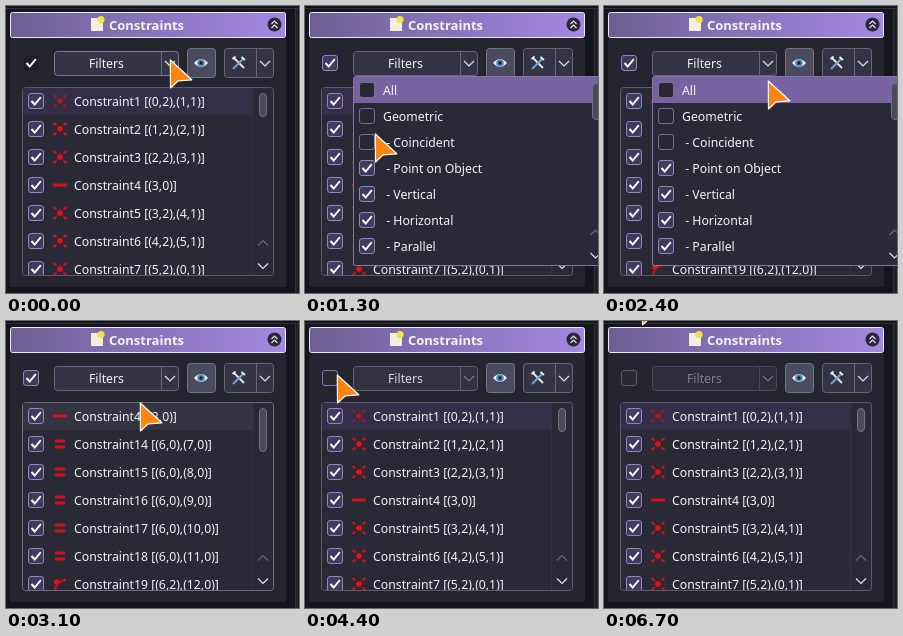
Animation of 293x287 px, one loop 6800 ms. Source, as an HTML page:

```html
<!DOCTYPE html>
<html lang="en">
<head>
<meta charset="utf-8">
<title>Constraints filter</title>
<style>
html, body { margin: 0; width: 100%; height: 100%; overflow: hidden; background: #15151e; }
svg { display: block; width: 100vw; height: 100vh; }
text { font: 12.27px "Noto Sans", "Open Sans", sans-serif; fill: #f4f3f8; white-space: pre; }
.title { font-size: 13px; font-weight: 700; }
.line { fill: none; stroke: #e4e2ec; stroke-width: 1.2; }
.button { fill: #343444; stroke: #68667a; }
.red { fill: none; stroke: #d0141a; stroke-width: 2; }
.thick { stroke-width: 3; }
.dot { fill: #d9161c; stroke: #5c1018; stroke-width: .6; }
</style>
</head>
<body>
<svg id="stage" viewBox="0 0 293 287" preserveAspectRatio="none">
  <defs>
    <linearGradient id="header"><stop stop-color="#6d5f94"/><stop offset="1" stop-color="#a488e2"/></linearGradient>
    <linearGradient id="smear" x1="0" y1="0" x2="0" y2="1">
      <stop stop-color="#57555d"/><stop offset=".4" stop-color="#4d4a56"/>
      <stop offset=".75" stop-color="#484258"/><stop offset="1" stop-color="#3d394b"/>
    </linearGradient>
    <clipPath id="listClip"><rect x="17" y="82" width="250" height="187"/></clipPath>
    <clipPath id="popupClip"><rect id="reveal" x="47" width="246" height="300"/></clipPath>
  </defs>

  <rect width="293" height="287" fill="#15151e"/>
  <path d="M0 2.5H293M289.5 3V287" stroke="#30303c" fill="none"/>
  <rect x="290" y="3" width="3" height="284" fill="#20202a"/>
  <rect x="4" y="32" width="276" height="249" rx="2" fill="#252530"/>

  <rect x="4.5" y="6.5" width="275" height="25" rx="2" fill="url(#header)" stroke="#ece8f7"/>
  <path d="M85 12H97V25H85Z" fill="#f3f0df"/>
  <circle cx="95" cy="13.5" r="3.6" fill="#f3e34a"/>
  <text class="title" x="103" y="24">Constraints</text>
  <circle cx="268.5" cy="18.5" r="7" fill="#2b273a"/>
  <path class="line" d="M265.5 18L268.5 15L271.5 18M265.5 22L268.5 19L271.5 22"/>

  <g id="master"></g>
  <g id="combo">
    <rect id="comboBox" class="button" x="48.5" y="45.5" width="124" height="24" rx="3"/>
    <path d="M155.5 46V69" stroke="#68667a"/>
  </g>
  <text id="filters" x="83" y="62">Filters</text>
  <path id="comboArrow" class="line" d="M159 55L164 60L169 55"/>

  <rect x="181.5" y="42.5" width="28" height="29" rx="3" fill="#4a4b5c" stroke="#737487"/>
  <path d="M188 57Q195 49 202 57Q195 65 188 57Z" fill="#f0f0f4"/>
  <circle cx="195" cy="57" r="3.8" fill="#4a8fc2"/><circle cx="195" cy="57" r="1.8" fill="#17202c"/>
  <rect class="button" x="218.5" y="42.5" width="49" height="29" rx="3"/>
  <path d="M250.5 43V71" stroke="#68667a"/>
  <path d="M228 52L238 62" stroke="#e8e9ee" stroke-width="1.8"/>
  <path d="M237 53L227 63" stroke="#6fa4d8" stroke-width="2"/>
  <path d="M226.5 53L229.5 50.5M235.5 51L239 54" stroke="#e8e9ee" stroke-width="2"/>
  <path class="line" d="M254 55L259 60L264 55"/>

  <rect id="listFrame" x="16.5" y="81.5" width="251" height="188" rx="3" fill="#292a35"/>
  <g clip-path="url(#listClip)">
    <path d="M246.5 82V269" stroke="#343541"/>
    <g id="fullList"></g>
    <rect id="listHover" x="17" y="82" width="229" height="27" fill="#343541"/>
    <g id="filteredList"></g>
  </g>
  <rect id="thumb" x="253.5" y="87.5" width="7" rx="3.5" fill="#4b4a59" stroke="#737181"/>
  <path class="line" d="M252 239.5L257 234.5L262 239.5" style="stroke:#696773"/>
  <path class="line" d="M252 257.5L257 262.5L262 257.5"/>

  <g id="popup" clip-path="url(#popupClip)">
    <rect x="48.5" y="70.5" width="250" height="189" rx="2" fill="#292a35" stroke="#8177a3"/>
    <rect x="49" y="71" width="250" height="26" fill="#7763a3"/>
    <rect id="hoverRow" x="49" y="123" width="235" height="26" fill="#3c3950"/>
    <g id="options"></g>
    <rect x="287.5" y="77.5" width="9" height="36" rx="3.5" fill="#4b4a59" stroke="#737181"/>
    <path class="line" d="M285.5 229L290.5 224L295.5 229" style="stroke:#696773"/>
    <path class="line" d="M285.5 247L290.5 252L295.5 247"/>
  </g>
  <path id="band" fill="url(#smear)" opacity=".97"/>

  <path id="cursor" d="M1.3 2L1.5 30L9.3 22.8L22.800 21.800Z" fill="#ff8410" stroke="#fff" stroke-width="1.2" stroke-linejoin="round"/>
</svg>
<script>
const LOOP = 6800, STEP = 100;
const el = id => document.getElementById(id);
const set = (id, attrs) => Object.entries(attrs).forEach(([k, v]) => el(id).setAttribute(k, v));
const show = (id, on) => set(id, { visibility: on ? "visible" : "hidden" });

const checkbox = (x, y, name = "") => `<g class="${name}" transform="translate(${x} ${y})">
  <rect class="box" x="-7.5" y="-7.5" width="15" height="15" rx="2.5" fill="#42395f" stroke="#9585bd"/>
  <path class="tick" d="M-4.500 0L-1.300 3.500L4.800-3.800" fill="none" stroke="#fff" stroke-width="1.9"/></g>`;

const icons = {
  coincident: '<path class="red" d="M-6.500-6L-3.500-3.500M6.500-6L3.500-3.500M-6.500 6L-3.500 3.500M6.500 6L3.500 3.500"/><circle class="dot" r="3.200"/>',
  horizontal: '<path class="red thick" d="M-7 0H7"/>',
  equal: '<path class="red thick" d="M-5-3H5M-5 3H5"/>',
  onObject: '<path class="red" d="M-5 8Q-5-2 5-4"/><circle class="dot" cx="-3" cy="-2" r="3.200"/><circle class="dot" cx="4.500" cy="-4" r="1.800"/>'
};

const listRows = rows => rows.map(([n, points, icon], i) => {
  const y = 95 + 28 * i;
  return checkbox(30, y) + `<g transform="translate(54 ${y})">${icons[icon]}</g>
    <text x="68" y="${y + 5}">Constraint${n} [${points}]</text>`;
}).join("");

const pairs = ["(0,2),(1,1)", "(1,2),(2,1)", "(2,2),(3,1)", "(3,0)", "(3,2),(4,1)", "(4,2),(5,1)", "(5,2),(0,1)"];
el("fullList").innerHTML = '<rect x="17" y="82" width="229" height="27" fill="#352e48"/>' +
  listRows(pairs.map((p, i) => [i + 1, p, i === 3 ? "horizontal" : "coincident"])) +
  '<rect x="46" y="87" width="16" height="16" fill="#352e48" opacity=".35"/>';
el("filteredList").innerHTML = listRows([
  [4, "(3,0)", "horizontal"],
  ...[7, 8, 9, 10, 11].map(k => [k + 7, `(6,0),(${k},0)`, "equal"]),
  [19, "(6,2),(12,0)", "onObject"]
]);

const options = ["All", "Geometric", " - Coincident", " - Point on Object", " - Vertical", " - Horizontal", " - Parallel"];
el("options").innerHTML = options.map((label, i) =>
  checkbox(62, 84 + 26 * i, i < 3 ? "toggle" : "") +
  `<text x="78" y="${89 + 26 * i}">${label}</text>`).join("");
el("master").innerHTML = checkbox(25, 57);

function styleCheckbox(group, checked, fill, border) {
  const box = group.querySelector(".box");
  group.querySelector(".tick").style.visibility = checked ? "visible" : "hidden";
  box.style.fill = fill;
  box.style.stroke = border;
}
const setChecked = (group, on, border) =>
  styleCheckbox(group, on, on ? "#42395f" : "#292832", on ? "#9585bd" : border);

// time, x, y
const path = [
  [0, 163, 52], [400, 163, 52], [700, 145, 73], [1000, 92, 79], [1300, 69, 126], [2100, 69, 126],
  [2400, 163, 73], [2500, 163, 73], [3100, 133, 80], [3200, 130, 78], [3700, 33, 56], [3800, 33, 56],
  [4200, 31, 52], [4500, 31, 52], [5000, 62, 96], [5300, 145, 138], [5700, 94, 92], [5800, 62, 52],
  [5900, 38, -36], [6400, 38, -36], [6500, 37, -26], [6800, 37, -26]
];
const clamp = v => Math.max(0, Math.min(1, v));
const ramp = (t, a, b) => clamp((t - a) / (b - a));

function cursorAt(t) {
  const i = path.findIndex(p => p[0] > t);
  const [a, b] = [path[i - 1], path[i]];
  const u = ramp(t, a[0], b[0]);
  return [a[1] + (b[1] - a[1]) * u, a[2] + (b[2] - a[2]) * u];
}

function drawPopup(t) {
  const open = t < 2000 ? ramp(t, 400, 950) : 1 - ramp(t, 2500, 3050);
  const moving = open > 0 && open < 1;
  const edge = 260 - 220 * open;
  const top = Math.max(71, edge - 5), bottom = Math.min(260, edge + 38);
  const low = Math.min(bottom, top + 12);
  show("popup", open > 0);
  show("band", moving && bottom > top);
  set("reveal", { y: open === 1 ? 60 : bottom - 3 });
  set("band", { d: `M48 ${top}L112 ${top - 1}L122 ${top + 1}L158 ${top}L160 ${top + 3}H207
    L204 ${low - 4}L212 ${low}H293V${bottom}H48Z` });
}

function render(t) {
  const filtered = t >= 1500 && t < 4400;
  const enabled = t < 4400;
  const fade = ramp(t, 4300, 4700);
  const inList = (t >= 2900 && t < 3400) || (t >= 4900 && t < 5800);
  const pressed = t >= 400 && t < 1000;
  const [x, y] = cursorAt(t);

  show("fullList", !filtered);
  show("filteredList", filtered);
  show("listHover", filtered && inList);
  set("thumb", { height: filtered ? 43 : 23 });
  set("listFrame", { stroke: inList ? "#6f6a86" : "#5c5a6c" });

  const master = el("master");
  if (t < 400) styleCheckbox(master, true, "#1e1e28", "#252530");
  else setChecked(master, enabled, t < 4900 ? "#8b73bd" : "#5c596d");
  set("filters", { opacity: 1 - .58 * fade });
  set("combo", { opacity: 1 - .45 * fade });
  set("comboArrow", { opacity: enabled ? 1 : .4 });
  set("comboBox", { style: pressed ? "fill:#4a4165;stroke:#8172ab" : t < 400 ? "stroke:#8172ab" : "" });

  document.querySelectorAll(".toggle").forEach(g => setChecked(g, t < 1300, "#77718b"));
  show("hoverRow", t >= 1500 && t < 2200);
  drawPopup(t);
  set("cursor", { transform: `translate(${x} ${y})` });
}

const start = performance.now();
function frame(now) {
  const t = Math.max(0, now - start) % LOOP;
  render(Math.floor(t / STEP) * STEP);
  requestAnimationFrame(frame);
}
render(0);
requestAnimationFrame(frame);
</script>
</body>
</html>
```
